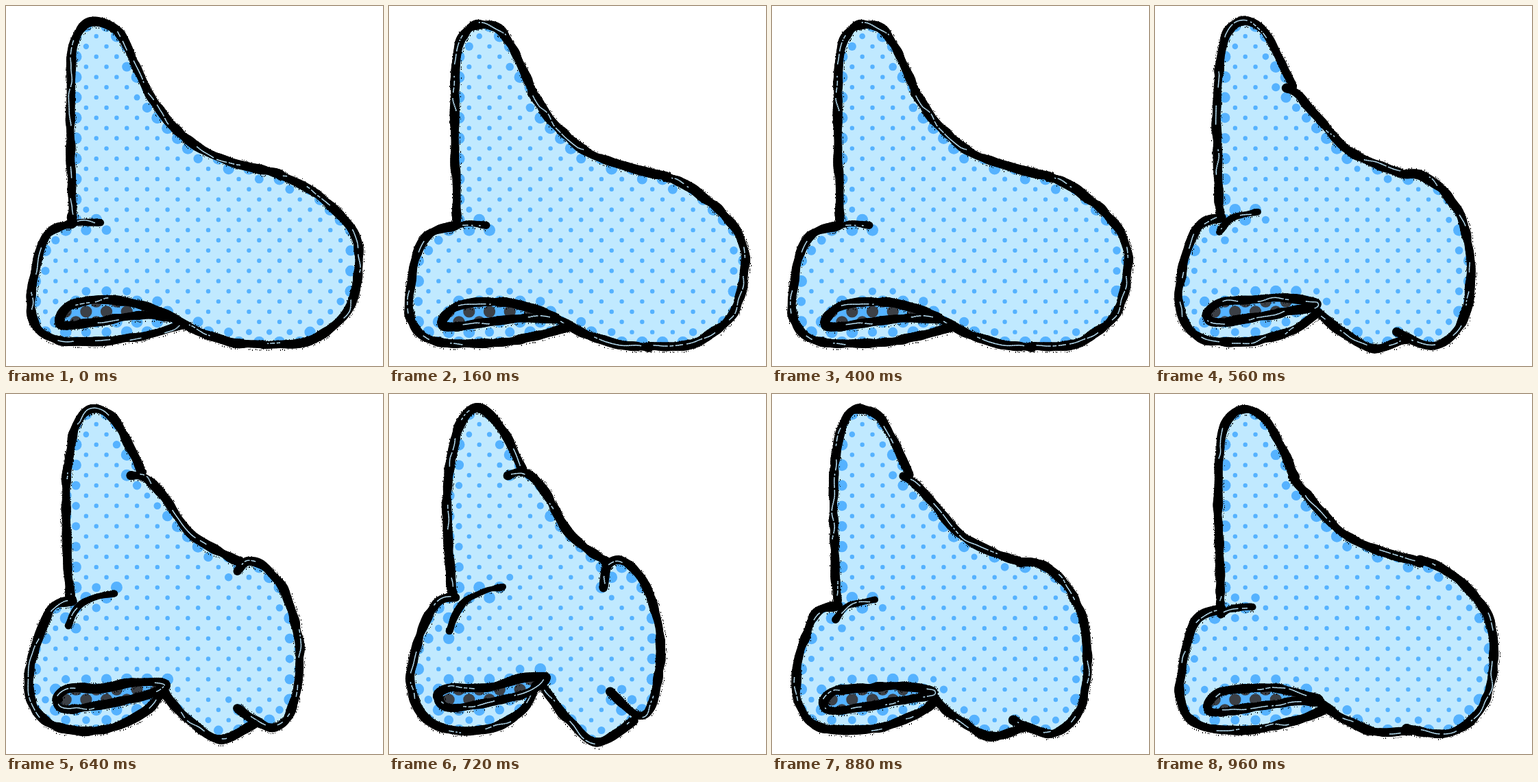
These frames come from a looping animation (550x524 px, 1040 ms). An HTML page with a canvas:

```html
<!DOCTYPE html>
<html lang="en">
<head>
<meta charset="utf-8">
<title>Halftone thumb</title>
<style>
  html, body { margin: 0; width: 100%; height: 100%; overflow: hidden; background: #fff; }
  canvas { display: block; width: 550px; height: 524px; }
</style>
</head>
<body>
<canvas id="stage" width="550" height="524"></canvas>
<script>
const ctx = document.getElementById('stage').getContext('2d');
const W = 550, H = 524;
const PALE = '#c0e9ff', BLUE = '#55b2ff', INK = '#000', SHADE = '#3c4046';
const STEP = 80, DRAWINGS = 13, TIGHTEST = 9;
const GRID = 14.85, SPACING = 2.5;

// Key points of the two extreme poses
const open = {
  thumb: [97,308, 94,180, 96,75, 107,37, 127,23, 160,34, 184,75, 205,122],
  back: [205,122, 218,143, 245,177, 300,217, 400,245],
  finger: [400,245, 445,268, 492,309, 514,350, 512,400, 494,450, 440,488, 375,493],
  under: [375,493, 330,490, 285,475, 262,464, 240,452],
  palm: [258,464, 210,478, 140,488, 70,485, 40,455, 40,400, 58,335, 97,316],
  crease: [97,316, 112,314, 138,316],
  hollow: [78,458, 95,435, 140,428, 190,433, 240,452, 195,451, 95,464]
};
const fist = {
  thumb: [92,292, 84,170, 92,85, 108,35, 130,20, 153,35, 178,75, 195,113],
  back: [173,118, 198,114, 228,142, 262,203, 318,245],
  finger: [313,282, 318,250, 340,243, 372,275, 396,350, 388,440, 365,468, 323,433],
  under: [357,475, 303,508, 262,475, 245,456, 218,416],
  palm: [214,425, 195,460, 145,488, 75,485, 38,450, 34,390, 66,308, 97,296],
  crease: [88,345, 112,300, 166,280],
  hollow: [72,440, 90,427, 140,428, 190,415, 230,412, 195,437, 95,457]
};

// grip 0..1 closes the hand, sway 0..1 is the idle wobble
function pose(name, grip, sway) {
  const a = open[name], b = fist[name], n = a.length / 2;
  const mix = i => a[i] + (b[i] - a[i]) * grip;
  const curl = name === 'finger' ? 68 * grip * (1 - grip) : 0;
  return Array.from({ length: n }, (_, i) => {
    const x = mix(2 * i), y = mix(2 * i + 1);
    const bulge = 4 - 12 * Math.exp(-(((x - 40) / 40) ** 2));
    return [x + sway * bulge, y + sway * 3 - curl * Math.cos(4.2 * i / (n - 1))];
  });
}

function random(seed) {
  let s = seed * 7919 + 17;
  return () => (s = (s * 16807) % 2147483647) / 2147483647;
}

// Smooth noise in -1..1 along a stroke
function ripple(rnd, size) {
  const v = Array.from({ length: 64 }, () => rnd() * 2 - 1);
  return d => {
    const t = d / size, i = Math.floor(t), f = t - i, e = f * f * (3 - 2 * f);
    return v[i % 64] * (1 - e) + v[(i + 1) % 64] * e;
  };
}

// Evenly spaced Catmull-Rom samples
function sample(keys, closed) {
  const n = keys.length, out = [];
  const at = i => keys[closed ? (i + n) % n : Math.max(0, Math.min(n - 1, i))];
  const spline = (a, b, c, d, t) =>
    b + t / 2 * (c - a + t * (2 * a - 5 * b + 4 * c - d + t * (3 * (b - c) + d - a)));
  for (let i = 0; i < (closed ? n : n - 1); i++) {
    const [a, b, c, d] = [at(i - 1), at(i), at(i + 1), at(i + 2)];
    const m = Math.ceil(Math.hypot(c[0] - b[0], c[1] - b[1]) / SPACING);
    for (let k = 0; k < m; k++) {
      out.push([0, 1].map(j => spline(a[j], b[j], c[j], d[j], k / m)));
    }
  }
  out.push(at(closed ? 0 : n - 1));
  return out;
}

function disc(x, y, r) {
  ctx.beginPath();
  ctx.arc(x, y, r, 0, 7);
  ctx.fill();
}

// Fills a shape, then covers it with a staggered grid of dots
function halftone(pts, ground, ink, radius) {
  ctx.save();
  ctx.beginPath();
  for (const [x, y] of pts) ctx.lineTo(x, y);
  ctx.clip();
  ctx.fillStyle = ground;
  ctx.fillRect(0, 0, W, H);
  ctx.fillStyle = ink;
  for (let j = -3; j < 33; j++) {
    for (let i = -9; i < 29; i++) {
      if ((i + j) % 2) continue;
      const x = 131.7 + i * GRID, y = 44 + j * GRID;
      disc(x, y, radius(x, y));
    }
  }
  ctx.restore();
}

function inkStroke(pts, width, rnd) {
  const wobble = ripple(rnd, 22), weight = ripple(rnd, 13), gap = ripple(rnd, 24);
  const off = (i, d) => {
    const a = pts[Math.max(0, i - 1)], b = pts[Math.min(pts.length - 1, i + 1)];
    const dx = b[0] - a[0], dy = b[1] - a[1], l = Math.hypot(dx, dy) || 1;
    return [pts[i][0] - dy / l * d, pts[i][1] + dx / l * d];
  };
  ctx.fillStyle = INK;
  pts.forEach((p, i) => {
    const d = i * SPACING, r = width / 2 + weight(d);
    disc(...off(i, wobble(d)), r);
    const [x, y] = off(i, (rnd() < 0.5 ? -1 : 1) * (r + rnd() * 1.4));
    ctx.fillRect(Math.round(x), Math.round(y), 1, 1 + Math.round(rnd()));
  });
  // Thin dry-brush slits
  ctx.strokeStyle = PALE;
  ctx.lineWidth = 1.5;
  for (let i = 3; i < pts.length - 5; i++) {
    const d = i * SPACING;
    if (gap(d) < 0.2 || rnd() < 0.12) continue;
    const side = wobble(d + 200) * width / 4;
    ctx.beginPath();
    ctx.moveTo(...off(i, side));
    ctx.lineTo(...off(i + 1, side));
    ctx.stroke();
  }
}

function draw(index) {
  const grip = Math.max(0, 1 - 0.28 * Math.abs(index - TIGHTEST));
  const idle = index % 3;
  const rnd = random(grip ? index + 5 : idle + 1);
  const line = {};
  for (const name in open) {
    line[name] = sample(pose(name, grip, grip ? 0 : idle / 2), name === 'hollow');
  }
  const { thumb, back, finger, under, palm, hollow } = line;
  const edges = Object.values(line).flat();
  const edgeDistance = (x, y) => Math.sqrt(
    edges.reduce((d, p) => Math.min(d, (p[0] - x) ** 2 + (p[1] - y) ** 2), 1e6));

  ctx.fillStyle = '#fff';
  ctx.fillRect(0, 0, W, H);
  halftone([thumb, back, finger, under, palm].flat(), PALE, BLUE,
    (x, y) => Math.min(8.5, 3.2 + 0.55 * Math.max(0, 20 - edgeDistance(x, y))));
  halftone(hollow, BLUE, SHADE, () => 8.6);
  for (const name in line) inkStroke(line[name], name === 'crease' ? 9.5 : 13, rnd);
}

let shown = -1;
function tick() {
  const index = Math.floor(performance.now() / STEP) % DRAWINGS;
  if (index !== shown) draw(shown = index);
  requestAnimationFrame(tick);
}
tick();
</script>
</body>
</html>
```
